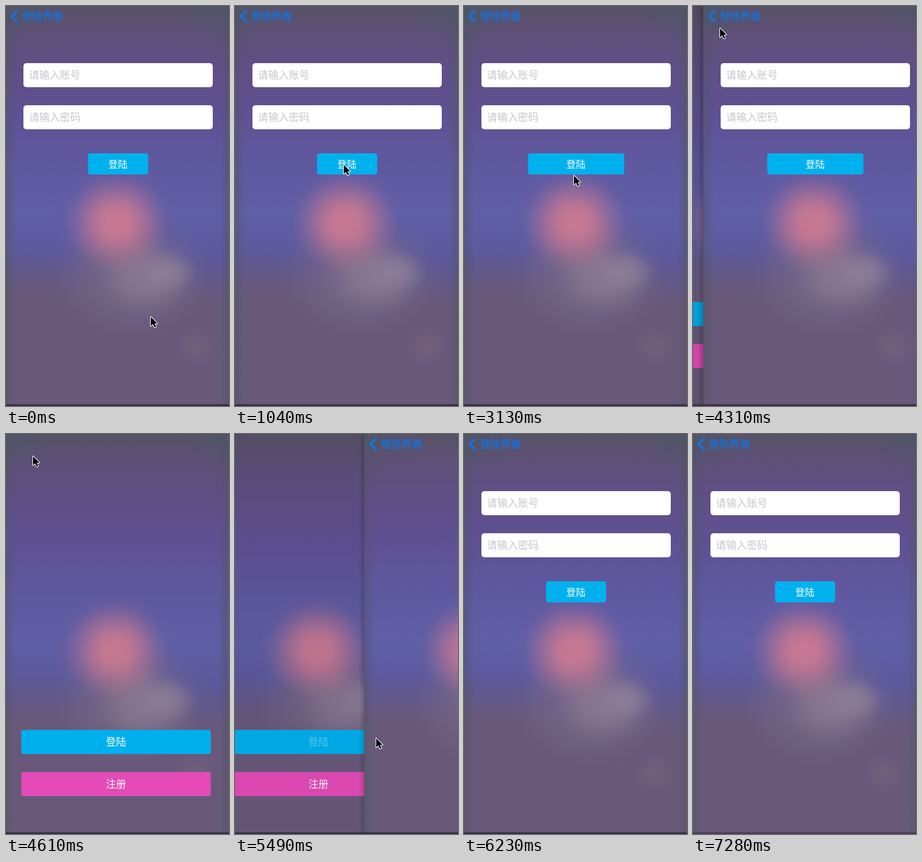
Write an HTML page with a canvas that moves like this. It is 371 px wide and 665 px high and loops after 7380 ms.

```html
<!DOCTYPE html>
<html lang="zh">
<head>
<meta charset="utf-8">
<style>
  html, body { margin: 0; width: 100%; height: 100%; overflow: hidden; background: #5f5790; }
  canvas { display: block; }
</style>
</head>
<body>
<canvas id="stage" width="371" height="665"></canvas>
<script>
const W = 371, H = 665, LOOP = 7380, STEP = 148.2, LAST = 42;
const BLUE = '#00b1ee', PINK = '#e54bb8', LINK = '#007aff';
const FONT = '"Noto Sans CJK SC", "Noto Sans CJK", sans-serif';
const BACK = 4279, PUSH = 5405, TAP = 1046;
const ctx = document.getElementById('stage').getContext('2d');

const arrow = new Path2D('M0 0V15L3.5 11.8L6 17.3L8.5 16.3L6.2 11L10.5 10.7Z');

// places the pointer visits, eased in between
const stops = [
  { n: 0, x: 240, y: 516 },
  { n: 7, x: 180, y: 263 },
  { n: 12, x: 48, y: 11 },
  { n: 14, x: 176, y: 333 },
  { n: 21, x: 182, y: 281 },
  { n: 25, x: 182, y: 281 },
  { n: 29, x: 44, y: 36 },
  { n: 32, x: 44, y: 36 },
  { n: 36, x: 234, y: 505 },
  { n: 39, x: 234, y: 505 },
  { n: LAST, x: 388, y: 720 }
];

const clamp = u => Math.min(1, Math.max(0, u));
const smooth = u => u * u * (3 - 2 * u);
const mix = (a, b, k) => a + (b - a) * k;

// critically damped page slide
function slide(ms) {
  const a = Math.max(0, ms) * 0.01826;
  return 1 - Math.exp(-a) * (1 + a);
}

// cubic-bezier(.42, 0, .58, 1), solved by bisection
function ease(u) {
  if (u <= 0 || u >= 1) return clamp(u);
  let lo = 0, hi = 1;
  for (let i = 0; i < 20; i++) {
    const s = (lo + hi) / 2, q = 1 - s;
    if (1.26 * q * q * s + 1.74 * q * s * s + s ** 3 < u) lo = s; else hi = s;
  }
  return smooth(lo);
}

// bouncing width, damping ratio 0.2
function buttonWidth(t) {
  if (t < TAP || t >= PUSH) return 100;
  const s = (t - TAP) / 1000;
  return 160 - 60 * Math.exp(-4.6 * s) * (Math.cos(22.5 * s) + 0.204 * Math.sin(22.5 * s));
}

// soft ellipse with a smooth falloff
function glow(c, x, y, rx, ry, rgb, alpha) {
  const g = c.createRadialGradient(0, 0, 0, 0, 0, 1);
  for (let p = 0; p <= 1; p += 0.125) {
    const k = clamp((p - 0.1) / 0.9);
    g.addColorStop(p, `rgba(${rgb},${alpha * (1 - smooth(k))})`);
  }
  c.save();
  c.translate(x, y);
  c.scale(rx, ry);
  c.fillStyle = g;
  c.fillRect(-1, -1, 2, 2);
  c.restore();
}

function fade(c, x0, y0, x1, y1, from, to) {
  const g = c.createLinearGradient(x0, y0, x1, y1);
  g.addColorStop(0, from);
  g.addColorStop(1, to);
  c.fillStyle = g;
  c.fillRect(0, 0, W, H);
}

function makeBackdrop() {
  const cv = document.createElement('canvas');
  cv.width = W;
  cv.height = H;
  const c = cv.getContext('2d');

  const sky = c.createLinearGradient(0, 0, 0, 430);
  ['#5c506b', '#5f4f82', '#5f5092', '#5f589f', '#5f5ea6', '#5c589c']
    .forEach((color, i) => sky.addColorStop(i / 5, color));
  c.fillStyle = sky;
  c.fillRect(0, 0, W, H);

  // land, then the hill and its light side
  fade(c, 187, 408, 183, 482, 'rgba(104,89,123,0)', 'rgba(104,89,123,1)');
  glow(c, 210, 448, 145, 118, '118,104,134', 0.85);
  glow(c, 235, 450, 92, 72, '142,126,150', 0.7);
  glow(c, 270, 442, 55, 40, '146,130,156', 0.55);
  glow(c, 318, 565, 40, 38, '118,98,124', 0.6);
  glow(c, 184, 360, 98, 94, '206,122,145', 0.93);

  const edge = 'rgba(82,84,100,.5)', clear = 'rgba(82,84,100,0)';
  fade(c, 0, 0, 18, 0, edge, clear);
  fade(c, W, 0, W - 16, 0, edge, clear);
  fade(c, 0, 0, 0, 36, edge, clear);
  for (const x of [0, W]) glow(c, x, 0, 90, 70, '74,88,104', 0.5);
  return cv;
}

const backdrop = makeBackdrop();

function box(x, y, w, h, r, color) {
  ctx.fillStyle = color;
  ctx.beginPath();
  ctx.roundRect(x, y, w, h, r);
  ctx.fill();
}

function label(text, x, midY, size, color, align = 'left') {
  ctx.font = `${size}px ${FONT}`;
  ctx.textAlign = align;
  ctx.fillStyle = color;
  ctx.fillText(text, x, midY + size * 0.38);
}

function field(dx, y, hint) {
  box(29 + dx, y, 315, 40, 5, '#fff');
  label(hint, 38 + dx, y + 19.5, 17.2, '#c7c7cd');
}

function wideButton(y, text, color, ink = '#fff') {
  box(28, y, 315, 40, 4, color);
  label(text, 185.5, y + 20, 16.8, ink, 'center');
}

function drawHome(x, dim, t) {
  ctx.save();
  ctx.translate(x, 0);
  ctx.drawImage(backdrop, 0, 0);
  wideButton(492, '登陆', BLUE, t > PUSH - 80 ? 'rgba(255,255,255,.35)' : '#fff');
  wideButton(562, '注册', PINK);
  ctx.fillStyle = `rgba(0,0,0,${dim})`;
  ctx.fillRect(0, 0, W, H);
  ctx.restore();
}

function drawBackLink(x) {
  ctx.save();
  ctx.translate(x, 0);
  ctx.strokeStyle = LINK;
  ctx.lineWidth = 3;
  ctx.stroke(new Path2D('M19 7.5L9.3 17L19 26.5'));
  label('登陆界面', 26.5, 17, 17.1, LINK);
  ctx.restore();
}

function drawLogin(x, t) {
  const arrive = start => t >= PUSH ? ease((t - start) / 500) : 1;
  ctx.save();
  ctx.translate(x, 0);
  ctx.beginPath();
  ctx.rect(0, 0, W, H);
  ctx.clip();
  ctx.drawImage(backdrop, 0, 0);
  field(-W * (1 - arrive(5423)), 95, '请输入账号');
  field(-W * (1 - arrive(5645)), 165, '请输入密码');

  const shown = arrive(5720), w = buttonWidth(t);
  ctx.globalAlpha = shown;
  ctx.translate(0, 30 * (1 - shown));
  box(186.5 - w / 2, 245, w, 35, 4, BLUE);
  label('登陆', 186.3, 262.5, 16, '#fff', 'center');
  ctx.restore();
}

function drawCursor(n) {
  if (n >= LAST) return;
  const i = stops.findIndex(s => s.n > n);
  const a = stops[i - 1], b = stops[i];
  const k = smooth((n - a.n) / (b.n - a.n));
  ctx.save();
  ctx.translate(Math.round(mix(a.x, b.x, k)) + 1, Math.round(mix(a.y, b.y, k)) + 1);
  ctx.lineJoin = 'round';
  ctx.lineWidth = 2;
  ctx.strokeStyle = '#fff';
  ctx.stroke(arrow);
  ctx.fillStyle = '#000';
  ctx.fill(arrow);
  ctx.restore();
}

function draw(now) {
  const n = Math.min(LAST, Math.floor(now / STEP));
  const t = n * STEP;
  let x = 0;
  if (t >= PUSH) x = n === LAST ? 0 : W * (1 - slide(t - PUSH));
  else if (t >= BACK) x = W * slide(t - BACK);

  const page = Math.floor(x), cover = 1 - x / W;
  if (page > 0) {
    drawHome(-0.3 * W * cover, 0.1 * cover, t);
    const shade = 0.2 * Math.min(1, cover * 2);
    const g = ctx.createLinearGradient(page - 9, 0, page, 0);
    g.addColorStop(0, 'rgba(0,0,0,0)');
    g.addColorStop(1, `rgba(0,0,0,${shade})`);
    ctx.fillStyle = g;
    ctx.fillRect(page - 9, 0, 9, H);
  }
  drawLogin(page, t);
  drawBackLink(Math.ceil(x));
  ctx.fillStyle = now >= 7280 ? '#4d3f5b' : '#3b3245';
  ctx.fillRect(0, 662, W, 3);
  drawCursor(n);
}

const start = performance.now();
function tick() {
  draw((performance.now() - start) % LOOP);
  requestAnimationFrame(tick);
}
tick();
</script>
</body>
</html>
```
